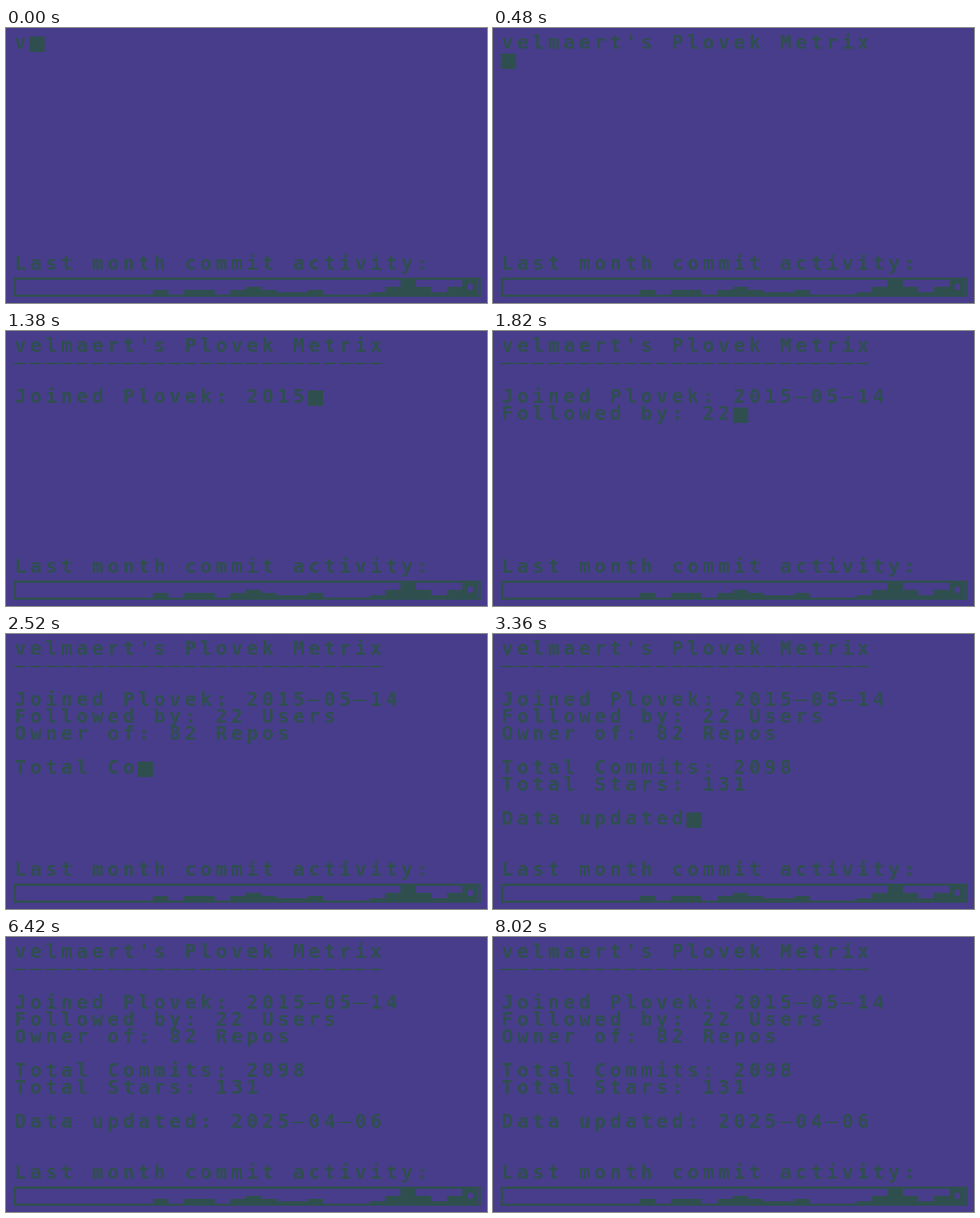
These frames come from a looping animation (622 by 356 pixels, 8.42 s). An HTML page:

```html
<!DOCTYPE html>
<html lang="en">
<head>
<meta charset="utf-8">
<title>Commit metrics</title>
<style>
  html, body { margin: 0; width: 100%; height: 100%; overflow: hidden; background: #483d8b; }
  #stage { position: relative; width: 622px; height: 356px; overflow: hidden; color: #2f4f4f;
    font: bold 25px/22px "DejaVu Sans Mono", monospace; }
  #stage span { position: absolute; width: 17px; height: 22px; text-align: center; white-space: pre; }
  #stage .dash { color: transparent; }
  .dash::after { content: ""; position: absolute; left: 0; top: 11px; width: 16px; height: 2px; background: #2f4f4f; }
  #cursor { position: absolute; width: 20px; height: 20px; background: #2f4f4f; }
  svg { position: absolute; left: 0; top: 0; }
</style>
</head>
<body>
<div id="stage">
  <svg width="622" height="356" fill="#2f4f4f" shape-rendering="crispEdges">
    <rect x="11" y="324.5" width="601" height="22" fill="none" stroke="#2f4f4f" stroke-width="3"/>
    <g id="bars"></g>
    <rect x="597" y="331" width="7" height="8" rx="2" fill="#483d8b" shape-rendering="auto"/>
  </svg>
  <div id="cursor"></div>
</div>
<script>
const CELL = 20, LINE = 22, LEFT = 10, TOP = 11;
const STEP = 20, LOOP = 8420, BLINK_FROM = 3620, BLINK = 400;

const text = [
  "velmaert's Plovek Metrix",
  "-".repeat(24),
  "",
  "Joined Plovek: 2015-05-14",
  "Followed by: 22 Users",
  "Owner of: 82 Repos",
  "",
  "Total Commits: 2098",
  "Total Stars: 131",
  "",
  "Data updated: 2025-04-06"
].join("\n");

const stage = document.getElementById("stage");
const cursor = document.getElementById("cursor");

function addChar(ch, col, row) {
  const el = document.createElement("span");
  el.textContent = ch;
  if (ch === "-") el.className = "dash";
  el.style.left = LEFT + col * CELL + "px";
  el.style.top = TOP - 3 + row * LINE + "px";
  stage.appendChild(el);
  return el;
}

// Each typed character, with the cursor cell that follows it.
let col = 0, row = 0;
const typed = [...text].map(ch => {
  let el = null;
  if (ch === "\n") { col = 0; row++; }
  else el = addChar(ch, col++, row);
  return { el, col, row };
});

[..."Last month commit activity:"].forEach((ch, i) => addChar(ch, i, 13));

// First day, number of days, bar height
const bars = [
  [9, 1, 8], [11, 2, 8], [14, 1, 8], [15, 1, 12], [16, 1, 8], [17, 2, 5], [19, 1, 8],
  [23, 1, 5], [24, 1, 12], [25, 1, 24], [26, 1, 12], [27, 1, 5], [28, 1, 12], [29, 1, 24]
];
document.getElementById("bars").innerHTML = bars.map(([day, days, h]) =>
  `<rect x="${LEFT + day * CELL}" y="${347 - h}" width="${days * CELL}" height="${h}"/>`).join("");

const start = performance.now();
let shown = -1;

function draw(now) {
  const t = Math.max(0, now - start) % LOOP;
  const count = Math.min(typed.length, Math.floor(t / STEP) + 1);
  if (count !== shown) {
    typed.forEach(({ el }, i) => { if (el) el.style.visibility = i < count ? "visible" : "hidden"; });
    const at = typed[count - 1];
    cursor.style.left = LEFT + at.col * CELL + "px";
    cursor.style.top = TOP + at.row * LINE + "px";
    shown = count;
  }
  const off = t >= BLINK_FROM && Math.floor((t - BLINK_FROM) / BLINK) % 2 === 1;
  cursor.style.visibility = off ? "hidden" : "visible";
  requestAnimationFrame(draw);
}
draw(start);
</script>
</body>
</html>
```
